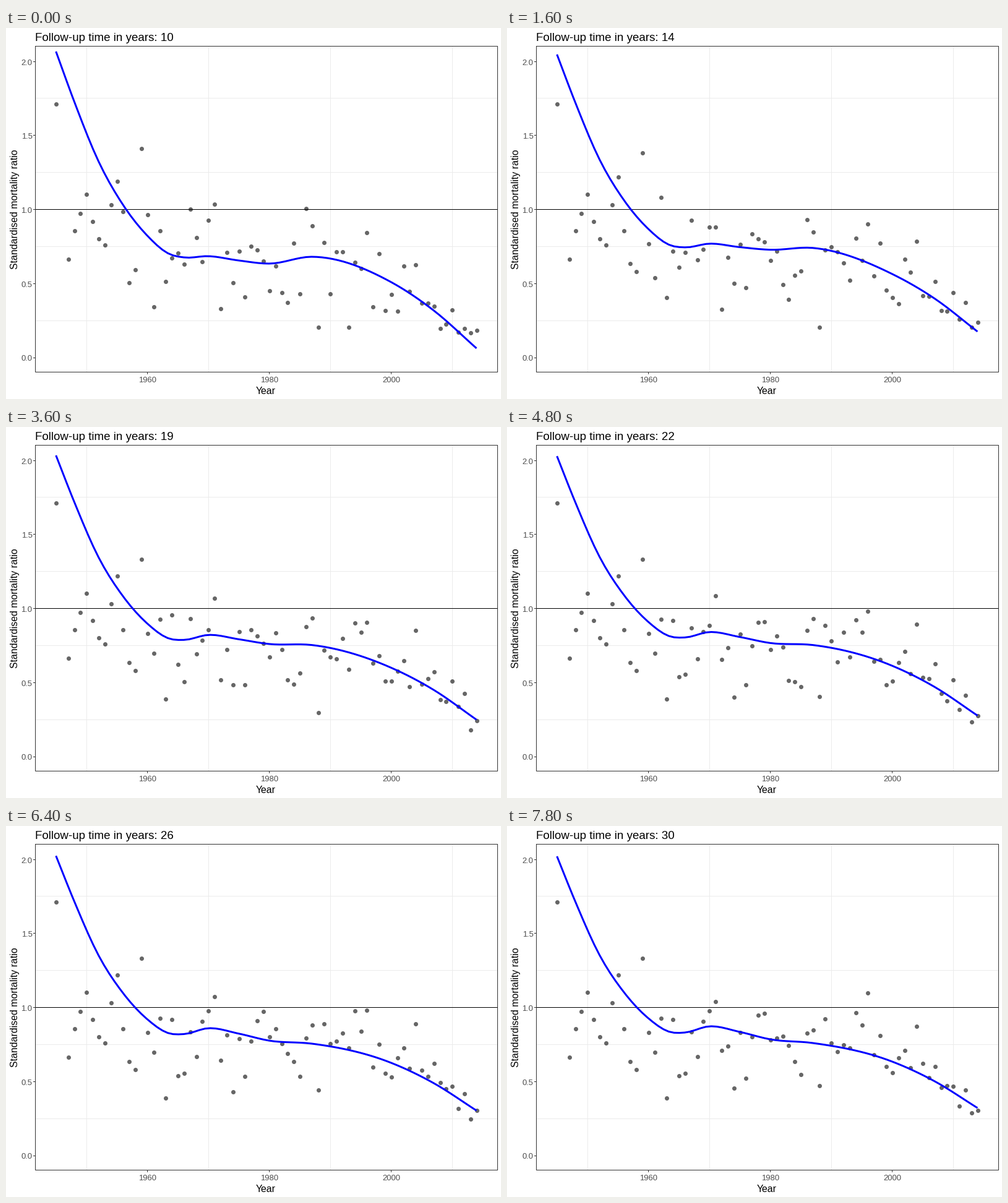
These frames come from a looping animation (800 by 600 pixels, 8000 ms). A matplotlib script:

```python
import numpy as np
import matplotlib.pyplot as plt
from matplotlib.animation import FuncAnimation

W, H, DPI = 800, 600, 100
FRAMES, INTERVAL = 40, 200
FIRST, LAST = 10, 30
LEFT, RIGHT, TOP, BOTTOM = 47, 794, 29, 556

plt.rcParams["font.family"] = "Liberation Sans"

# Trend line: a few knots in years and their pixel heights at both ends.
KNOTS = np.array([1945, 1948, 1952, 1956, 1960, 1963.5, 1966,
                  1970, 1975, 1980, 1987, 2000, 2007, 2014])
TREND_START = np.array([38, 119, 216, 286, 336, 365, 371, 369, 376, 381, 370, 411, 457, 518])
TREND_END = np.array([49, 122, 209, 269, 311, 333, 334, 324, 333, 345, 351, 381, 413, 456])
CURVE_YEARS = np.linspace(1945, 2014, 80)

# Mean mortality ratio by year of entry, early and late in follow-up.
YEARS = np.array([1945, *range(1947, 2015)])
LEVEL_YEARS = [1945, 1947, 1960, 1980, 1994, 2005, 2014]
LEVEL_START = [1.71, 0.9, 0.9, 0.72, 0.7, 0.3, 0.15]
LEVEL_END = [1.71, 0.9, 0.93, 0.8, 0.75, 0.56, 0.27]


def px(size):
    return size * 72 / DPI


def year_x(year):
    return 228.5 + (year - 1960) * 9.85


def ratio_y(ratio):
    return 533 - ratio * 239.5


def progress(time):
    """A running ratio changes quickly at first, then slower."""
    return (1 / FIRST - 1 / time) / (1 / FIRST - 1 / LAST)


def dot_heights():
    """Running means of yearly noise around the level, one row per follow-up year."""
    rng = np.random.default_rng(5)
    start = np.interp(YEARS, LEVEL_YEARS, LEVEL_START)
    end = np.interp(YEARS, LEVEL_YEARS, LEVEL_END)
    spread = np.where(YEARS < 1956, 0.5, 0.9) * (YEARS > 1945)
    settled = np.clip(YEARS - 1944, FIRST, LAST)
    total = rng.normal(size=len(YEARS)) * np.sqrt(FIRST)
    rows = []
    for year in range(FIRST, LAST + 1):
        if year > FIRST:
            total += rng.normal(size=len(YEARS)) * (year <= settled)
        time = np.minimum(year, settled)
        level = start + (end - start) * progress(time)
        rows.append(np.maximum(level * (1 + 1.25 * spread * total / time), 0))
    return ratio_y(np.array(rows))


def smooth(y):
    """Cubic Hermite curve through the knots."""
    slope = np.gradient(y, KNOTS)
    i = np.clip(np.searchsorted(KNOTS, CURVE_YEARS, "right") - 1, 0, len(KNOTS) - 2)
    step = KNOTS[i + 1] - KNOTS[i]
    t = (CURVE_YEARS - KNOTS[i]) / step
    return ((1 + 2 * t) * (1 - t) ** 2 * y[i] + t * (1 - t) ** 2 * step * slope[i]
            + t * t * (3 - 2 * t) * y[i + 1] + t * t * (t - 1) * step * slope[i + 1])


def trend_heights(time):
    """Ease between both ends, with a passing lift around the 1980s."""
    p = progress(time)
    lift = 8 * np.sin(np.pi * p) ** 2 * np.exp(-((KNOTS - 1983) / 8) ** 2)
    return smooth(TREND_START + (TREND_END - TREND_START) * p - lift)


DOTS = dot_heights()

fig = plt.figure(figsize=(W / DPI, H / DPI), dpi=DPI, facecolor="white")
ax = fig.add_axes([0, 0, 1, 1])
ax.set(xlim=(0, W), ylim=(H, 0))
ax.axis("off")


def rule(xs, ys, color, z=1):
    """One-pixel line through pixel centres."""
    ax.plot(np.floor(xs) + 0.5, np.floor(ys) + 0.5, color=color, lw=px(1),
            solid_capstyle="projecting", solid_joinstyle="miter", snap=False, zorder=z)


def label(x, y, text, size, color="black", **kw):
    return ax.text(x, y, text, fontsize=px(size), color=color, va="baseline", **kw)


for year in (1950, 1970, 1990, 2010):
    rule([year_x(year)] * 2, [TOP, BOTTOM], "#ebebeb")
for ratio in (0.25, 0.75, 1.25, 1.75):
    rule([LEFT, RIGHT], [ratio_y(ratio)] * 2, "#ebebeb")
for year in (1960, 1980, 2000):
    rule([year_x(year)] * 2, [BOTTOM, BOTTOM + 3], "#333333")
    label(year_x(year), 573, str(year), 13, "#4d4d4d", ha="center")
for ratio in (0, 0.5, 1, 1.5, 2):
    rule([LEFT - 3, LEFT], [ratio_y(ratio)] * 2, "#333333")
    label(42.5, ratio_y(ratio) + 5.5, f"{ratio:.1f}", 13, "#4d4d4d", ha="right")
rule([LEFT, RIGHT], [ratio_y(1)] * 2, "black", 2)
rule([LEFT, RIGHT, RIGHT, LEFT, LEFT], [TOP, TOP, BOTTOM, BOTTOM, TOP], "#333333", 5)

label(420, 592, "Year", 15.9, ha="center")
label(19, 293, "Standardised mortality ratio", 15.9, rotation=90,
      rotation_mode="anchor", ha="center")
title = label(47, 21, "", 18.8)

dots, = ax.plot([], [], "o", ms=px(7), mfc="black", mec="none", alpha=0.6, zorder=3)
trend, = ax.plot([], [], color="blue", lw=px(3), solid_capstyle="butt",
                 solid_joinstyle="round", zorder=4)


def draw(frame):
    time = FIRST + (LAST - FIRST) * frame / (FRAMES - 1)
    title.set_text(f"Follow-up time in years: {int(time + 0.5)}")

    row = min(int(time), LAST - 1) - FIRST
    part = time - FIRST - row
    dots.set_data(year_x(YEARS) + 0.3, DOTS[row] * (1 - part) + DOTS[row + 1] * part)
    trend.set_data(year_x(CURVE_YEARS), trend_heights(time))
    return title, dots, trend


anim = FuncAnimation(fig, draw, frames=FRAMES, init_func=lambda: draw(0),
                     interval=INTERVAL, repeat=True, repeat_delay=0, blit=False)
plt.show()
```
